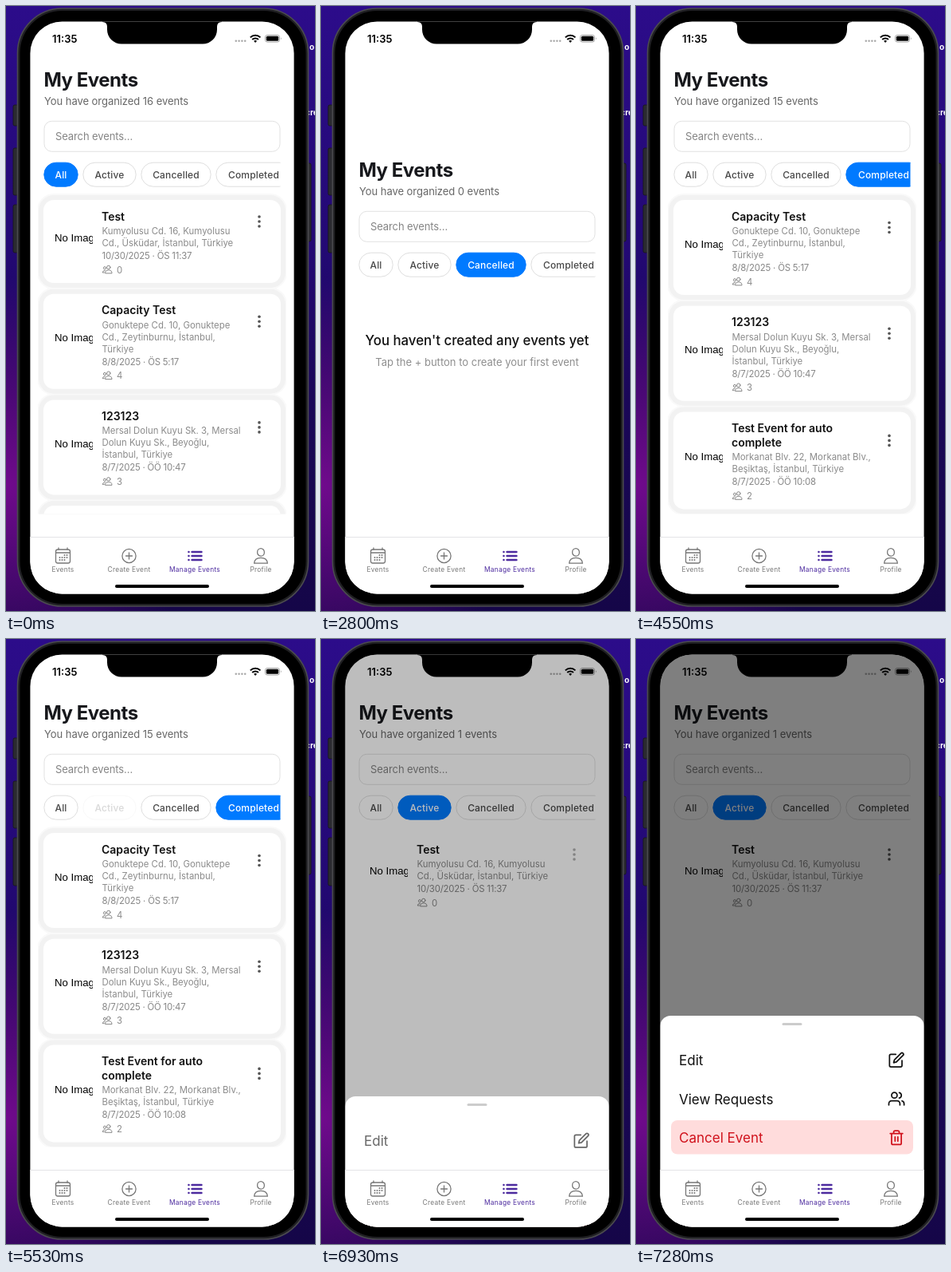
Animation of 388x758 px, one loop 8 s. Source, as an HTML page:

```html
<!DOCTYPE html>
<html lang="en">
<head>
<meta charset="utf-8">
<title>My Events</title>
<style>
html, body { margin: 0; width: 100%; height: 100%; overflow: hidden; background: #180850; }
svg { display: block; width: 100vw; height: 100vh; font-family: Inter, "Noto Sans", sans-serif; }
text { white-space: pre; }
.title { font-size: 24px; font-weight: 700; letter-spacing: -.5px; fill: #17181c; }
.sub { font-size: 13px; letter-spacing: -.05px; fill: #666; }
.hint { font-size: 13px; letter-spacing: -.1px; fill: #858585; }
.chip { font-size: 12px; font-weight: 500; letter-spacing: .15px; }
.name { font-size: 14px; font-weight: 600; fill: #111; }
.info { font-size: 11.4px; fill: #8b8b8b; }
.date { font-size: 11.4px; letter-spacing: -.2px; fill: #868686; }
.none { font: 13.2px "Liberation Sans", Arial, sans-serif; fill: #000; }
.empty { font-size: 16.8px; font-weight: 500; fill: #111; text-anchor: middle; }
.tip { font-size: 13px; fill: #8e8e8e; text-anchor: middle; }
.tab { font-size: 8.4px; letter-spacing: .25px; text-anchor: middle; }
.row { font-size: 17px; }
.line { fill: none; stroke-linecap: round; stroke-linejoin: round; }
</style>
</head>
<body>
<svg viewBox="0 0 388 758" preserveAspectRatio="none">
  <defs>
    <linearGradient id="sky" x1="0" y1="0" x2="0" y2="1">
      <stop offset="0" stop-color="#2c0c8a"/>
      <stop offset=".4" stop-color="#230974"/>
      <stop offset=".65" stop-color="#1a0758"/>
      <stop offset="1" stop-color="#150648"/>
    </linearGradient>
    <radialGradient id="glow" gradientUnits="userSpaceOnUse" cx="0" cy="600" r="260">
      <stop offset="0" stop-color="#700a8c"/>
      <stop offset="1" stop-color="#700a8c" stop-opacity="0"/>
    </radialGradient>
    <clipPath id="screenClip"><rect x="30.4" y="19.4" width="331.2" height="717" rx="40"/></clipPath>
    <clipPath id="listClip"><rect x="40" y="233" width="312" height="403.5"/></clipPath>
    <clipPath id="chipClip"><rect x="47" y="190" width="297.5" height="42"/></clipPath>
    <clipPath id="thumbClip"><rect x="61" y="0" width="48" height="130"/></clipPath>
  </defs>

  <rect width="388" height="758" fill="url(#sky)"/>
  <rect width="388" height="758" fill="url(#glow)"/>
  <g fill="#fff" font-size="10" font-weight="700">
    <text x="381" y="55">o</text>
    <text x="376" y="137">cre</text>
  </g>

  <g fill="#2b2b30" stroke="#17171a" stroke-width=".8">
    <rect x="9" y="124" width="8" height="26" rx="2"/>
    <rect x="9" y="178" width="8" height="59" rx="2"/>
    <rect x="9" y="249" width="8" height="60" rx="2"/>
    <rect x="376" y="197" width="7" height="98" rx="2"/>
  </g>
  <rect x="14.5" y="3" width="365" height="749" rx="56" fill="#202023" stroke="#4b4b4f" stroke-width="1.6"/>
  <rect x="17.5" y="6" width="359" height="743" rx="53" fill="#000"/>

  <g clip-path="url(#screenClip)">
    <rect x="30" y="19" width="332" height="718" fill="#fff"/>
    <text x="58" y="45.5" font-size="13" font-weight="600">11:35</text>
    <g fill="#aaa">
      <circle cx="288.8" cy="43.8" r="1.3"/><circle cx="292.6" cy="43.8" r="1.3"/>
      <circle cx="296.4" cy="43.8" r="1.3"/><circle cx="300.2" cy="43.8" r="1.3"/>
    </g>
    <g class="line" stroke="#000" stroke-width="2" style="stroke-linecap:butt">
      <path d="M306.8 39.4a9 9 0 0 1 12.6 0M309.2 42a5.6 5.6 0 0 1 7.8 0"/>
      <path d="M313.1 46l-2-2.2a3 3 0 0 1 4 0z" fill="#000" stroke="none"/>
    </g>
    <rect x="325.5" y="36.5" width="18" height="8.6" rx="2.6" fill="none" stroke="#999" stroke-width=".9"/>
    <rect x="326.8" y="37.8" width="15.4" height="6" rx="1.5"/>
    <path d="M345 39.3q1.6 1.5 0 3z" fill="#999"/>

    <g id="page"></g>
    <rect id="dim" x="30" y="19" width="332" height="718" opacity="0"/>
    <g id="sheet">
      <rect x="30.4" y="0" width="331.2" height="280" rx="13" fill="#fff"/>
      <rect x="183.5" y="9" width="25" height="3" rx="1.5" fill="#ccc"/>
      <g id="rows"></g>
    </g>
    <g id="tabs"></g>
    <rect x="137" y="725" width="118" height="4" rx="2"/>
    <path d="M121 19v1q6 0 6 6v3.6a18 18 0 0 0 18 18h102a18 18 0 0 0 18-18v-3.6q0-6 6-6v-1z"/>
  </g>
</svg>

<script>
const LOOP = 8000, STEP = 70, HOLD = 140, RECOVER = 210;
const $ = id => document.getElementById(id);
const text = (cls, x, y, str, extra = "") => `<text class="${cls}" x="${x}" y="${y}" ${extra}>${str}</text>`;
const at = (x, y, body, extra = "") => `<g transform="translate(${x} ${y})" ${extra}>${body}</g>`;

const events = [
  { name: ["Test"], place: ["Kumyolusu Cd. 16, Kumyolusu", "Cd., Üsküdar, İstanbul, Türkiye"],
    date: "10/30/2025 · ÖS 11:37", guests: 0 },
  { name: ["Capacity Test"], place: ["Gonuktepe Cd. 10, Gonuktepe", "Cd., Zeytinburnu, İstanbul,", "Türkiye"],
    date: "8/8/2025 · ÖS 5:17", guests: 4 },
  { name: ["123123"], place: ["Mersal Dolun Kuyu Sk. 3, Mersal", "Dolun Kuyu Sk., Beyoğlu,", "İstanbul, Türkiye"],
    date: "8/7/2025 · ÖÖ 10:47", guests: 3 },
  { name: ["Test Event for auto", "complete"], place: ["Morkanat Blv. 22, Morkanat Blv.,", "Beşiktaş, İstanbul, Türkiye"],
    date: "8/7/2025 · ÖÖ 10:08", guests: 2 }
];
const chips = [
  { label: "All", x: 48, w: 42 },
  { label: "Active", x: 97, w: 66 },
  { label: "Cancelled", x: 170, w: 87 },
  { label: "Completed", x: 264, w: 94 }
];
const views = [
  { count: 16, list: [0, 1, 2, 3] },
  { count: 1, list: [0] },
  { count: 0, list: [] },
  { count: 15, list: [1, 2, 3] }
];
const taps = [[1540, 1], [2310, 2], [3850, 3], [5530, 1]];
const MENU_TAP = 6720, SHEET_START = 6860, SHEET_TIME = 360;

// Opacity of a control pressed at a given time
function pressAlpha(t, start) {
  if (t < start) return 1;
  return Math.min(1, .2 + .8 * Math.max(0, t - start - HOLD) / RECOVER);
}

const peopleIcon = `<g class="line" stroke="#888" stroke-width="1">
  <circle cx="7.8" cy="2.9" r="2.2"/><path d="M3.6 10q0-3.6 4.2-3.6t4.2 3.6z"/>
  <circle cx="3" cy="3.8" r="1.6"/><path d="M3.4 6.9q-3-.1-3.2 2.6h2.2"/></g>`;

function card(event, top, dotAlpha) {
  const { name, place } = event;
  const h = 104 + (name.length - 1) * 18 + (place.length - 2) * 15;
  const first = 43 + (name.length - 1) * 18;
  const last = first + (place.length - 1) * 15;
  const dots = [-6, 0, 6].map(d => `<circle cx="318" cy="${h / 2 - 25 + d}" r="1.8"/>`).join("");
  const body = `<rect x="47" width="298" height="${h}" rx="13" fill="#fff"/>` +
    `<g clip-path="url(#thumbClip)">${text("none", 61, h / 2, "No Image")}</g>` +
    name.map((s, i) => text("name", 120, 25.5 + i * 18.5, s)).join("") +
    place.map((s, i) => text("info", 120.5, first + i * 15, s)).join("") +
    text("date", 120.5, last + 16, event.date) +
    at(121, last + 23.5, peopleIcon) +
    text("info", 139, last + 33.5, event.guests) +
    `<g fill="#555" opacity="${dotAlpha}">${dots}</g>`;
  const halo = [[8, "#f9f9f9"], [6, "#f2f2f2"]].map(([d, fill]) =>
    `<rect x="${47 - d}" y="${top - d}" width="${298 + 2 * d}" height="${h + 2 * d}" rx="${13 + d}" fill="${fill}"/>`);
  return { h, halo, body: at(0, top, body) };
}

function cardList(list, dotAlpha, shadow) {
  let top = 243;
  const cards = list.map(i => {
    const c = card(events[i], top, dotAlpha);
    top += c.h + 13.7;
    return c;
  });
  const layer = pick => cards.map(pick).join("");
  const halos = shadow ? layer(c => c.halo[0]) + layer(c => c.halo[1]) : "";
  return `<g clip-path="url(#listClip)">${halos}${layer(c => c.body)}</g>`;
}

function chip(c, i, selected, t) {
  const alpha = Math.min(...taps.filter(p => p[1] === i).map(p => pressAlpha(t, p[0])), 1);
  const on = i === selected;
  return `<g opacity="${alpha}"><rect x="${c.x - .2}" y="196.2" width="${c.w + .4}" height="30" rx="15"
    fill="${on ? "#007aff" : "#fff"}" stroke="${on ? "#007aff" : "#dedede"}"/>` +
    text("chip", c.x + c.w / 2, 215.8, c.label, `text-anchor="middle" fill="${on ? "#fff" : "#484848"}"`) + `</g>`;
}

function page(t) {
  const selected = taps.reduce((s, [time, i]) => t >= time + HOLD ? i : s, 0);
  const { count, list } = views[selected];
  const header = text("title", 47.5, 101.3, "My Events") +
    text("sub", 48, 123.6, `You have organized ${count} events`) +
    `<rect x="48" y="144.3" width="296" height="38" rx="9.5" fill="#fff" stroke="#dedede" stroke-width=".9"/>` +
    text("hint", 62, 168, "Search events...") +
    `<g clip-path="url(#chipClip)">${chips.map((c, i) => chip(c, i, selected, t)).join("")}</g>`;
  if (list.length) return cardList(list, pressAlpha(t, MENU_TAP), t <= SHEET_START) + header;
  return at(0, 113, header) +
    text("empty", 196, 425, "You haven't created any events yet") +
    text("tip", 196, 451.3, "Tap the + button to create your first event");
}

function buildSheet() {
  const rows = [
    ["Edit", "#111", `<path d="M11 4H4a2 2 0 0 0-2 2v14a2 2 0 0 0 2 2h14a2 2 0 0 0 2-2v-7"/>
      <path d="M18.5 2.5a2.1 2.1 0 0 1 3 3L12 15l-4 1 1-4z"/>`],
    ["View Requests", "#111", `<path d="M17 21v-2a4 4 0 0 0-4-4H5a4 4 0 0 0-4 4v2M23 21v-2a4 4 0 0 0-3-3.9M16 3.1a4 4 0 0 1 0 7.8"/>
      <circle cx="9" cy="7" r="4"/>`],
    ["Cancel Event", "#d0121c", `<path d="M3 6h18M19 6v14a2 2 0 0 1-2 2H7a2 2 0 0 1-2-2V6m3 0V4a2 2 0 0 1 2-2h4a2 2 0 0 1 2 2v2M10 11v6M14 11v6"/>`]
  ];
  $("rows").innerHTML = `<rect x="44" y="131" width="304" height="42.5" rx="8" fill="#ffdcdc"/>` +
    rows.map(([label, color, icon], i) => {
      const y = 55.5 + i * 48.7;
      return text("row", 54, y + 6.5, label, `fill="${color}"`) +
        `<g class="line" stroke="${color}" stroke-width="2" transform="translate(316.6 ${y - 10.6}) scale(.87)">${icon}</g>`;
    }).join("");
}

function buildTabs() {
  const days = [[2, -1], [5, -1], [-4, 2], [-1, 2], [2, 2], [5, 2], [-4, 5], [-1, 5], [2, 5]]
    .map(([x, y]) => `<circle cx="${x}" cy="${y}" r="1" fill="#777" stroke="none"/>`).join("");
  const bullets = [-5, 0, 5].map(y => `<path d="M-7.6 ${y}h.2M-3.5 ${y}h12"/>`).join("");
  const tabs = [
    ["Events", 71.5, `<rect x="-9" y="-8" width="18" height="17" rx="2.5"/><path d="M-9-4h18M-5.5-8v-2M5.5-8v-2"/>${days}`],
    ["Create Event", 154.5, `<circle r="8.6"/><path d="M-4 0h8M0-4v8"/>`],
    ["Manage Events", 237, `<g stroke-width="2.4">${bullets}</g>`],
    ["Profile", 320, `<ellipse cy="-4.6" rx="4.4" ry="4.8"/><path d="M-8.4 9.2q.6-6.8 8.4-6.8t8.4 6.8z"/>`]
  ];
  $("tabs").innerHTML = `<rect x="30" y="665" width="332" height="72" fill="#fff"/>
    <path d="M30 665.5h332" stroke="#e4e4e6"/>` +
    tabs.map(([label, x, icon], i) => {
      const color = i === 2 ? "#4c2a9e" : "#777";
      return at(x, 689, icon, `class="line" stroke="${color}" stroke-width="1.3"`) +
        text("tab", x, 709, label, `fill="${color}"`);
    }).join("");
}

let shown = "";
function render(t) {
  const html = page(t);
  if (html !== shown) $("page").innerHTML = shown = html;
  const u = Math.min(1, Math.max(0, (t - SHEET_START) / SHEET_TIME));
  const p = 1 - (1 - u) ** 3;
  $("dim").setAttribute("opacity", .5 * p ** .9);
  $("sheet").setAttribute("transform", `translate(0 ${665 - 193 * p})`);
  $("sheet").setAttribute("visibility", p > 0 ? "visible" : "hidden");
  $("rows").setAttribute("opacity", .3 + .7 * p);
}

function tick() {
  const t = performance.now() % LOOP;
  render(Math.floor(t / STEP) * STEP);
  requestAnimationFrame(tick);
}

buildSheet();
buildTabs();
tick();
</script>
</body>
</html>
```
